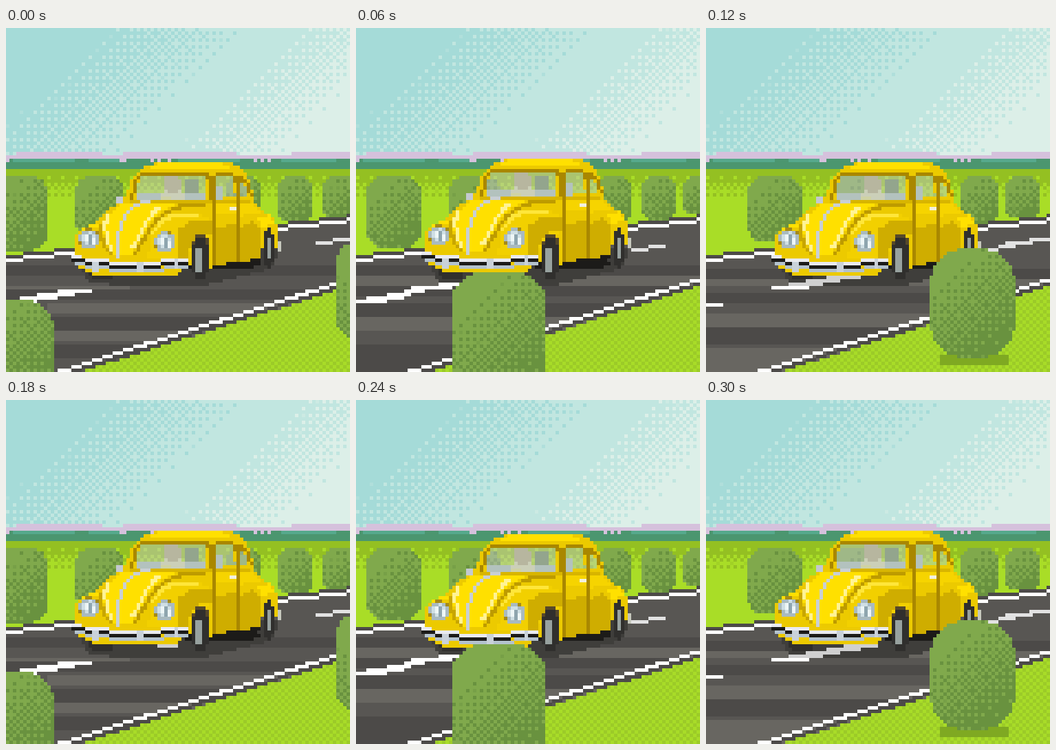
These frames come from a looping animation (500x500 px, 360 ms). An HTML page without scripts:

```html
<!DOCTYPE html>
<html lang="en">
<head>
<meta charset="utf-8">
<title>Yellow car on a country road</title>
<style>
  html, body { margin: 0; width: 100%; height: 100%; overflow: hidden; background: #a5dbd8; }
  svg { display: block; width: 500px; height: 500px; shape-rendering: crispEdges; }
  #bayer rect { width: 5px; height: 5px; }
  .line { fill: none; stroke-width: 5; }

  /* scenery: three poses, car: two poses */
  .p1, .p2, .p3 { animation: show .18s step-end infinite; }
  .p2 { animation-delay: -.12s; }
  .p3 { animation-delay: -.06s; }
  .body { animation: bob .12s step-end infinite; }
  @keyframes show { 0% { visibility: visible; } 33.333% { visibility: hidden; } }
  @keyframes bob { 0% { transform: translateY(0); } 50% { transform: translateY(-5px); } }
</style>
</head>
<body>
<svg viewBox="0 0 500 500">
  <defs>
    <!-- one sample per 5px cell, spread over the cell -->
    <filter id="pixels" filterUnits="userSpaceOnUse" x="0" y="0" width="500" height="500" color-interpolation-filters="sRGB">
      <feFlood x="2" y="2" width="1" height="1" flood-color="#000" result="dot"/>
      <feComposite in="dot" in2="dot" operator="over" x="0" y="0" width="5" height="5" result="cell"/>
      <feTile in="cell" x="0" y="0" width="500" height="500" result="grid"/>
      <feComposite in="SourceGraphic" in2="grid" operator="in"/>
      <feMorphology operator="dilate" radius="2"/>
    </filter>

    <!-- ordered dither: red holds the threshold, green the tone -->
    <pattern id="bayer" width="20" height="20" patternUnits="userSpaceOnUse">
      <rect fill="#f70000"/><rect x="5" fill="#770000"/><rect x="10" fill="#d70000"/><rect x="15" fill="#570000"/>
      <g transform="translate(0 5)"><rect fill="#370000"/><rect x="5" fill="#b70000"/><rect x="10" fill="#170000"/><rect x="15" fill="#970000"/></g>
      <g transform="translate(0 10)"><rect fill="#c70000"/><rect x="5" fill="#470000"/><rect x="10" fill="#e70000"/><rect x="15" fill="#670000"/></g>
      <g transform="translate(0 15)"><rect fill="#070000"/><rect x="5" fill="#870000"/><rect x="10" fill="#270000"/><rect x="15" fill="#a70000"/></g>
    </pattern>
    <rect id="grain" width="500" height="500" fill="url(#bayer)" opacity=".5"/>

    <!-- opaque where red + green pass the threshold on solid ground -->
    <filter id="skyMid" filterUnits="userSpaceOnUse" x="0" y="0" width="500" height="500" color-interpolation-filters="sRGB">
      <feColorMatrix values="0 0 0 0 .757  0 0 0 0 .902  0 0 0 0 .878  200 200 0 200 -300"/>
    </filter>
    <filter id="skyLight" filterUnits="userSpaceOnUse" x="0" y="0" width="500" height="500" color-interpolation-filters="sRGB">
      <feColorMatrix values="0 0 0 0 .863  0 0 0 0 .937  0 0 0 0 .910  200 200 0 200 -300"/>
    </filter>
    <filter id="meadow" filterUnits="userSpaceOnUse" x="0" y="0" width="500" height="500" color-interpolation-filters="sRGB">
      <feColorMatrix values="0 0 0 0 .580  0 0 0 0 .753  0 0 0 0 .133  200 200 0 200 -300"/>
    </filter>
    <filter id="leaf" filterUnits="userSpaceOnUse" x="0" y="0" width="500" height="500" color-interpolation-filters="sRGB">
      <feColorMatrix values="0 0 0 0 .412  0 0 0 0 .573  0 0 0 0 .247  200 200 0 200 -300"/>
    </filter>

    <linearGradient id="toMid" gradientUnits="userSpaceOnUse" x1="69" y1="73" x2="172" y2="182">
      <stop stop-color="#000"/><stop offset="1" stop-color="#0f0"/>
    </linearGradient>
    <linearGradient id="toLight" gradientUnits="userSpaceOnUse" x1="203" y1="215" x2="283" y2="299">
      <stop stop-color="#000"/><stop offset="1" stop-color="#0f0"/>
    </linearGradient>
    <linearGradient id="fade" x2="0" y2="1">
      <stop offset=".2" stop-color="#0f0"/><stop offset="1" stop-color="#000"/>
    </linearGradient>
    <linearGradient id="shade" x1=".3" y1=".15" x2=".8" y2=".9">
      <stop stop-color="#000"/><stop offset=".5" stop-color="#008000"/><stop offset="1" stop-color="#0f0"/>
    </linearGradient>

    <pattern id="lawn" width="10" height="10" patternUnits="userSpaceOnUse">
      <path fill="#a8dc28" d="M0 0h10v10H0z"/>
      <path fill="#9ccb28" d="M0 0h5v5H0zM5 5h5v5H5z"/>
    </pattern>

    <g id="far1">
      <rect x="-20" y="215" width="80" height="108" rx="24"/>
      <rect x="100" y="215" width="72" height="90" rx="24"/>
      <rect x="320" y="215" width="50" height="72" rx="18"/>
      <rect x="395" y="215" width="50" height="66" rx="17"/>
      <rect x="460" y="215" width="50" height="61" rx="17"/>
    </g>
    <g id="far2">
      <rect x="15" y="215" width="80" height="105" rx="26"/>
      <rect x="135" y="215" width="75" height="85" rx="24"/>
      <rect x="350" y="215" width="50" height="68" rx="17"/>
      <rect x="415" y="215" width="50" height="64" rx="17"/>
      <rect x="475" y="215" width="45" height="57" rx="17"/>
    </g>
    <g id="far3">
      <rect x="60" y="215" width="80" height="97" rx="26"/>
      <rect x="180" y="215" width="65" height="80" rx="22"/>
      <rect x="370" y="215" width="55" height="68" rx="18"/>
      <rect x="435" y="215" width="50" height="62" rx="17"/>
    </g>
    <g id="near1">
      <rect x="-60" y="395" width="130" height="150" rx="45"/>
      <rect x="480" y="310" width="120" height="142" rx="30"/>
    </g>
    <rect id="near2" x="140" y="355" width="135" height="190" rx="46" ry="40"/>
    <rect id="near3" x="325" y="320" width="125" height="160" rx="55"/>

    <g id="lamp">
      <circle r="15.5" fill="#a58a18"/>
      <circle r="14.5" fill="#a9bac0"/>
      <circle r="10" fill="#cfdfe4"/>
      <path fill="#8ea5ae" d="M-3-8h5V7h-5z"/>
      <path fill="#eef6f6" d="M-8-6h5V4h-5zM2-3h5V7H2z"/>
    </g>
  </defs>

  <g filter="url(#pixels)">
    <!-- sky and horizon -->
    <path fill="#a5dbd8" d="M0 0h500v500H0z"/>
    <g filter="url(#skyMid)"><rect width="500" height="190" fill="url(#toMid)"/><use href="#grain"/></g>
    <g filter="url(#skyLight)"><rect width="500" height="190" fill="url(#toLight)"/><use href="#grain"/></g>
    <path fill="#4b966f" d="M0 190h500v15H0z"/>
    <path fill="#56a98c" d="M10 190h90v5H10zM120 190h45v5h-45zM250 190h90v5h-90zM400 190h80v5h-80z"/>
    <path fill="#d5c1dc" d="M0 185h500v5H0zM15 180h125v5H15zM170 180h165v5H170zM415 180h85v5h-85zM0 190h5v5H0zM165 190h10v5h-10zM210 190h5v5h-5zM220 190h5v5h-5zM235 190h5v5h-5zM360 190h5v5h-5zM370 190h5v5h-5zM380 190h5v5h-5z"/>

    <!-- meadow -->
    <path fill="#a9dd27" d="M0 205h500v150H0z"/>
    <g filter="url(#meadow)"><rect y="205" width="500" height="45" fill="url(#fade)"/><use href="#grain"/></g>

    <g class="p1">
      <use href="#far1" fill="#80a94c"/>
      <g filter="url(#leaf)"><use href="#far1" fill="url(#shade)"/><use href="#grain"/></g>
    </g>
    <g class="p2">
      <use href="#far2" fill="#80a94c"/>
      <g filter="url(#leaf)"><use href="#far2" fill="url(#shade)"/><use href="#grain"/></g>
    </g>
    <g class="p3">
      <use href="#far3" fill="#80a94c"/>
      <g filter="url(#leaf)"><use href="#far3" fill="url(#shade)"/><use href="#grain"/></g>
    </g>

    <!-- road -->
    <path fill="#585653" d="M0 331L500 273V500H0z"/>
    <path class="line" stroke="#4c4a48" d="M0 333L500 274.5"/>
    <path class="line" stroke="#fff" d="M0 338L500 279.5"/>
    <g class="p1">
      <path fill="#4c4a48" d="M0 345H500V360H0zM0 380H500V395H0zM0 420H500V440H0zM0 460H500V480H0z"/>
      <path fill="#686661" d="M0 375H180V380H0zM60 400H500V415H60zM0 440H500V455H0z"/>
      <path fill="#fff" d="M75 380h50v5H75zM45 385h55v5H45zM20 390h55v5H20zM20 395h25v5H20z"/>
      <path fill="#e2e2e2" d="M475 305h25v5h-25zM450 310h25v5h-25z"/>
    </g>
    <g class="p2">
      <path fill="#4c4a48" d="M0 345H500V360H0zM0 375H500V390H0zM0 400H500V420H0zM0 460H500V500H0z"/>
      <path fill="#686661" d="M0 360H500V375H0zM0 420H500V440H0z"/>
      <path fill="#fff" d="M120 370h45v5h-45zM80 375h60v5H80zM70 380h30v5H70zM45 385h35v5H45zM15 390h55v5H15zM0 395h45v5H0z"/>
      <path fill="#e2e2e2" d="M425 315h25v5h-25zM400 320h25v5h-25z"/>
    </g>
    <g class="p3">
      <path fill="#4c4a48" d="M0 350H500V365H0zM0 385H500V400H0zM0 435H500V460H0z"/>
      <path fill="#686661" d="M0 365H500V375H0zM0 415H500V435H0zM0 465H500V500H0z"/>
      <path fill="#fff" d="M0 400h25v5H0zM95 375h55v5H95z"/>
      <path fill="#e2e2e2" d="M470 305h30v5h-30zM435 310h40v5h-40zM425 315h25v5h-25zM410 320h15v5h-15z"/>
    </g>
    <path fill="url(#lawn)" d="M108 500L500 375V500z"/>
    <path class="line" stroke="#4c4a48" d="M60 511.5L510 368"/>
    <path class="line" stroke="#fff" d="M60 505.5L510 362"/>

    <!-- shadow, tyres and underside -->
    <path fill="#3f3e3b" d="M108 342L118 367L160 374H290L385 350L396 330V320z"/>
    <path fill="#302f2d" d="M118 350h37v14h-30z"/>
    <path fill="#1c1b19" d="M250 340H372V347L300 350H262z"/>
    <path class="p1" fill="#d0d0d0" d="M225 350h25v10h-30v-5h5z"/>
    <path class="p3" fill="#d0d0d0" d="M200 355h50v5h-25v5h-30v5h-25v5h-50v-5h25v-5h30v-5h25z"/>

    <g class="body">
      <!-- shell with open windows -->
      <path fill="#ecca00" fill-rule="evenodd" d="M220 195H320L335 200L348 212L357 232L363 255L370 265L385 271L393 285L396 300V318L372 322V342L300 348L262 344L250 358H125L100 343L102 300L118 290L133 282L148 264L172 248L184 218L195 205z
        M187 247L193 221L201 213H284L291 219V248zM305 214H328L334 247H305zM336 219L347 230L353 246H338z"/>
      <!-- driver silhouette -->
      <path fill="#cfd2a4" d="M225 248V240L234 233H251L258 240V248z"/>
      <ellipse cx="242" cy="227" rx="14" ry="13" fill="#aaa676"/>
      <path fill="#c5cbd0" opacity=".45" d="M187 247L193 221L201 213H284L291 219V248zM305 214H328L334 247H305zM336 219L347 230L353 246H338z"/>
      <path fill="#b3c2be" d="M190 240H225V248H188zM258 240H288V248H258zM303 232H315V250H303z"/>
      <path fill="#93a58d" d="M262 220h20v20h-20z"/>

      <!-- roof and window frames -->
      <path fill="#ffe000" d="M205 204L222 196H312L330 204L300 207H225z"/>
      <path class="line" stroke="#a98700" d="M183 248L190 220L199 210H285L296 217V250M300 213V252M303 212H328L335 222L338 248M335 214L350 226L357 246"/>
      <path class="line" stroke="#d8b500" d="M180 250H356"/>

      <!-- side -->
      <path fill="#f6d400" d="M304 255H335V272H304zM340 255H360L368 268L340 274z"/>
      <path fill="#cfad00" d="M304 292L336 284V342L304 345zM340 290L358 282L372 296V338L340 342z"/>
      <path fill="#ffe000" d="M365 275L383 272L390 285L372 290z"/>
      <path class="line" stroke="#a98700" d="M302 252V345M337 252V342"/>
      <path fill="#f2f0e0" d="M325 260h10v5h-10z"/>
      <path fill="#c6c8bd" d="M395 308h5v17h-5z"/>
      <path fill="#1c1b19" d="M302 345L368 336V342L302 350z"/>

      <!-- front fender -->
      <path fill="#f2d000" d="M205 335L213 300L228 279L250 269H282L298 280V300L270 318L262 338z"/>
      <path fill="#cfad00" d="M250 292L272 280H299V300L282 302L270 312L262 335H248z"/>
      <path class="line" stroke="#ffe63a" d="M213 299L228 279L250 270H282"/>
      <path class="line" stroke="#bd9b00" d="M292 257H262L240 264L218 279L203 302L188 328"/>

      <!-- hood -->
      <path fill="#ffe000" d="M182 253H260L232 263L210 281L195 308L182 330L160 333L148 318L141 295L147 273L165 257z"/>
      <path class="line" stroke="#c8a600" d="M135 285L141 312L152 330"/>
      <path class="line" stroke="#fff394" d="M150 270L143 288L148 310L155 322M222 260L203 282L193 306L182 322"/>
      <path class="line" stroke="#c9cfd4" d="M208 252L190 256L177 268L168 285L163 305V333"/>
      <path fill="#ffe000" d="M108 294L120 288L133 284L135 292L121 290z"/>
      <path fill="#c3c9d0" d="M160 245h10v8h-10z"/>
      <use href="#lamp" x="121" y="307"/>
      <use href="#lamp" x="231" y="311"/>

      <!-- bumper -->
      <path class="line" stroke="#e9eaf1" d="M95 331L125 338L160 341H215L267 336"/>
      <path class="line" stroke="#1c1b19" d="M97 336L125 343L160 346H215L265 341"/>
      <path class="line" stroke="#b4c2cd" d="M100 341L125 348L160 351H215L250 349L264 345"/>
      <path fill="#c9d1d9" d="M125 338h10v16h-10zM190 340h10v15h-10zM245 336h6v16h-6z"/>
    </g>

    <!-- wheels -->
    <path fill="#57492a" d="M268 318L274 305L282 298L292 304L296 318z"/>
    <ellipse cx="282.5" cy="336" rx="13" ry="31" fill="#302f2d"/>
    <ellipse cx="280" cy="336" rx="5.5" ry="19" fill="#98a29f"/>
    <ellipse cx="382" cy="319" rx="8" ry="29" fill="#302f2d"/>
    <ellipse cx="382" cy="318" rx="4" ry="15" fill="#98a29f"/>

    <!-- near bushes -->
    <g class="p1">
      <use href="#near1" fill="#80a94c"/>
      <g filter="url(#leaf)"><use href="#near1" fill="url(#shade)"/><use href="#grain"/></g>
    </g>
    <g class="p2">
      <use href="#near2" fill="#80a94c"/>
      <g filter="url(#leaf)"><use href="#near2" fill="url(#shade)"/><use href="#grain"/></g>
    </g>
    <g class="p3">
      <path fill="#7fa922" d="M340 475h100v15H340z"/>
      <use href="#near3" fill="#80a94c"/>
      <g filter="url(#leaf)"><use href="#near3" fill="url(#shade)"/><use href="#grain"/></g>
    </g>
  </g>
</svg>
</body>
</html>
```
